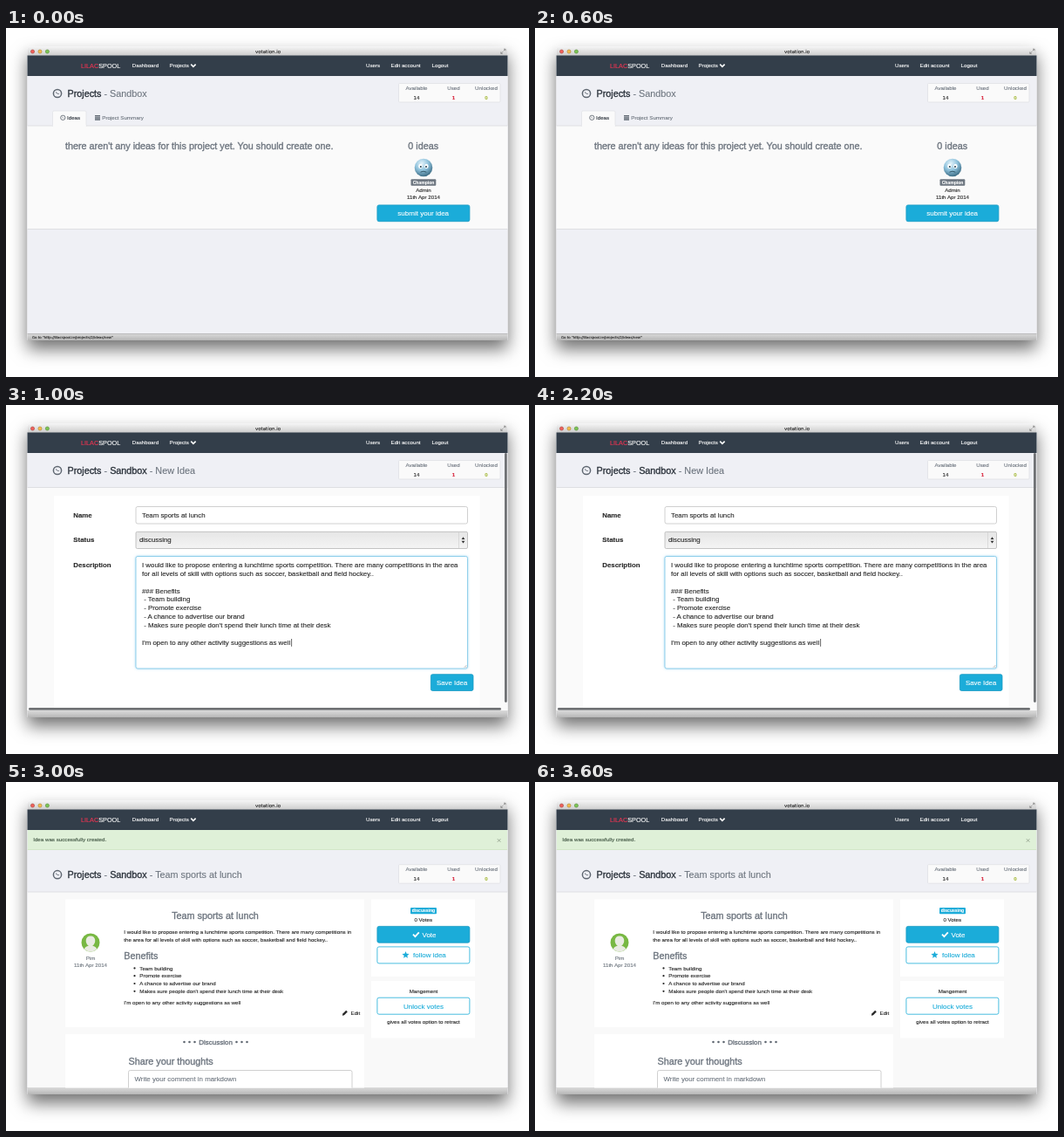
An HTML page for the animation above (4 s loop, 600 by 400 pixels).

```html
<!DOCTYPE html>
<html lang="en">
<head>
<meta charset="utf-8">
<title>Ideas</title>
<style>
  html, body { margin: 0; width: 100%; height: 100%; overflow: hidden; background: #fff; }
  svg { display: block; width: 600px; height: 400px; font-family: "Liberation Sans", Arial, sans-serif; }
  text { white-space: pre; color: #262626; stroke-width: .12px; }
  text, tspan { fill: currentColor; stroke: currentColor; }
  .xs { font-size: 6.2px; }
  .sm { font-size: 7.87px; }
  .btn { font-size: 8px; }
  .lg { font-size: 10.8px; }
  .tag { font-size: 5.05px; font-weight: bold; color: #fff; text-anchor: middle; }
  .ui { font-family: "DejaVu Sans", Verdana, sans-serif; }
  .mid { text-anchor: middle; }
  .med { stroke-width: .35px; }
  .bold { font-weight: bold; }
  .gray { color: #6d757f; }
  .dark { color: #2d343d; }
  .white { color: #fff; }
  .cyan { color: #1bacd9; }
  .red { color: #d8243c; }
  .lime { color: #a5b93a; }
  .pink { color: #ee3552; }
  .moss { color: #3f5441; }
  .card { fill: #fff; }
  .line { fill: none; stroke: #d9dade; stroke-width: .8; }
  .field { fill: #fff; stroke: #c4c4c4; stroke-width: .8; }
  .solid { fill: #1bacd9; stroke: #189ac3; stroke-width: .8; }
  .hollow { fill: #fff; stroke: #1bacd9; stroke-width: .8; }
  .badge { fill: #1bacd9; }
  .icon { fill: none; stroke: #5f6771; }

  .scene { animation: 4s step-end infinite; }
  #empty { animation-name: first; }
  #form { animation-name: second; }
  #result { animation-name: third; }
  @keyframes first { 0% { visibility: visible } 25%, 100% { visibility: hidden } }
  @keyframes second { 0% { visibility: hidden } 25% { visibility: visible } 75%, 100% { visibility: hidden } }
  @keyframes third { 0% { visibility: hidden } 75%, 100% { visibility: visible } }
</style>
</head>
<body>
<svg viewBox="0 0 600 400">
  <defs>
    <linearGradient id="chrome" x2="0" y2="1">
      <stop stop-color="#f4f4f4"/><stop offset="1" stop-color="#cbcbcb"/>
    </linearGradient>
    <linearGradient id="status" x2="0" y2="1">
      <stop stop-color="#dadada"/><stop offset="1" stop-color="#b6b6b6"/>
    </linearGradient>
    <linearGradient id="select" x2="0" y2="1">
      <stop stop-color="#e6e6e6"/><stop offset="1" stop-color="#f4f4f4"/>
    </linearGradient>
    <radialGradient id="ball" cx=".4" cy=".28" r=".75">
      <stop stop-color="#e4f4fb"/><stop offset=".5" stop-color="#8fc2dc"/><stop offset="1" stop-color="#37677f"/>
    </radialGradient>
    <filter id="shadow" x="-10%" y="-12%" width="120%" height="130%">
      <feDropShadow dx="0" dy="10" stdDeviation="9.5" flood-color="#000" flood-opacity=".56"/>
    </filter>
    <filter id="glow" x="-5%" y="-8%" width="110%" height="116%">
      <feDropShadow dx="0" dy="0" stdDeviation="1.4" flood-color="#66bfe9" flood-opacity=".6"/>
    </filter>
    <clipPath id="page"><rect x="24.5" y="55" width="551" height="295.5"/></clipPath>
    <g id="clock" class="icon">
      <circle r="4.6" stroke-width="1.5"/>
      <path d="M-2 -1.5 L.3 .4 H1.8" stroke-width="1"/>
    </g>
    <g id="stats">
      <rect x="450.5" y="63.5" width="116.5" height="21.5" rx="1" fill="#fafafa" stroke="#e0e1e5" stroke-width=".8"/>
      <g class="xs mid">
        <text x="471" y="71.2" class="gray">Available</text>
        <text x="513.5" y="71.2" class="gray">Used</text>
        <text x="551" y="71.2" class="gray">Unlocked</text>
        <text x="471" y="81.8">14</text>
        <text x="513.5" y="81.8" class="bold red">1</text>
        <text x="551" y="81.8" class="bold lime">0</text>
      </g>
    </g>
  </defs>

  <!-- window -->
  <path d="M24.5 358V25q0-3.5 3.5-3.5H572q3.5 0 3.5 3.5V358Z" fill="#eff0f5" filter="url(#shadow)"/>
  <path d="M24.5 32V25q0-3.5 3.5-3.5H572q3.5 0 3.5 3.5V32Z" fill="url(#chrome)"/>
  <g stroke-width=".6">
    <circle cx="30.5" cy="27" r="2.1" fill="#f0605a" stroke="#a5443f"/>
    <circle cx="39" cy="27" r="2.1" fill="#f6bd4c" stroke="#a98035"/>
    <circle cx="47.4" cy="27" r="2.1" fill="#7cc653" stroke="#54883a"/>
  </g>
  <text x="300.5" y="29.3" class="ui mid" font-size="5.45">votation.io</text>
  <path d="M570.8 26.3L572.8 24.3M571 24.2H573V26.2M570 27.2L568 29.2M567.8 27.3V29.4H569.8" fill="none" stroke="#777" stroke-width=".7"/>

  <rect x="24.5" y="31.5" width="551" height="23.5" fill="#333e4a"/>
  <text x="86" y="45.7" font-size="7.27" class="white"><tspan class="pink">LILAC</tspan>SPOOL</text>
  <g class="xs">
    <text x="144.8" y="45.2" class="white">Dashboard</text>
    <text x="187.5" y="45.2" class="white">Projects</text>
    <text x="413" y="45.2" class="white">Users</text>
    <text x="441.5" y="45.2" class="white">Edit account</text>
    <text x="488.5" y="45.2" class="white">Logout</text>
  </g>
  <path d="M212.2 41.6L214.9 44.3L217.6 41.6" fill="none" stroke="#fff" stroke-width="1.6"/>

  <rect x="24.5" y="350.5" width="551" height="7.5" fill="url(#status)"/>
  <path d="M24.5 350.6H575.5" stroke="#a6a6a6" stroke-width=".7"/>

  <!-- empty project -->
  <g id="empty" class="scene">
    <use href="#clock" x="59" y="75"/>
    <text x="70.5" y="79.2" class="lg gray"><tspan class="dark med">Projects</tspan> - Sandbox</text>
    <use href="#stats"/>
    <rect x="24.5" y="112" width="551" height="118.5" fill="#fafafa"/>
    <path d="M24.5 112H575.5M24.5 230.5H575.5" class="line"/>
    <path d="M53.5 113V96.5q0-1.5 1.5-1.5H90.5q1.5 0 1.5 1.5V113" fill="#fafafa" stroke="#e0e1e5" stroke-width=".7"/>
    <rect x="53.9" y="111" width="37.7" height="3" fill="#fafafa"/>
    <use href="#clock" transform="translate(65.3 102.8) scale(.58)"/>
    <text x="70" y="105.1" class="xs dark">Ideas</text>
    <path d="M102 100.7H108M102 102.9H108M102 105.1H108" class="icon" stroke-width="1.5"/>
    <text x="110.3" y="105.1" class="xs gray">Project Summary</text>
    <text x="68" y="139.2" class="lg gray med">there aren't any ideas for this project yet. You should create one.</text>
    <text x="478.7" y="139.2" class="lg gray med mid">0 ideas</text>
    <circle cx="479" cy="160" r="10.3" fill="url(#ball)"/>
    <g fill="#fff">
      <ellipse cx="475.4" cy="158.4" rx="2.2" ry="2.6"/><ellipse cx="482.4" cy="158.4" rx="2.2" ry="2.6"/>
    </g>
    <g fill="#23414f">
      <circle cx="475.8" cy="159" r="1"/><circle cx="482" cy="159" r="1"/>
    </g>
    <path d="M475.5 165.2q3.4-2 6.8 0" fill="none" stroke="#294b5b" stroke-width=".9"/>
    <rect x="464.5" y="173.2" width="28.8" height="7.6" rx="1" fill="#6d7680"/>
    <text x="479" y="178.9" class="tag">Champion</text>
    <text x="479" y="187.5" class="xs mid">Admin</text>
    <text x="479" y="196.2" class="xs mid">11th Apr 2014</text>
    <rect x="425.9" y="202.9" width="106" height="18.8" rx="2" class="solid"/>
    <text x="478.7" y="215" class="btn white mid">submit your idea</text>
    <text x="30" y="356" class="ui" font-size="3.95">Go to "http://lilacspool.ie/projects/2/ideas/new"</text>
  </g>

  <!-- new idea form -->
  <g id="form" class="scene">
    <use href="#clock" x="59" y="75"/>
    <text x="70.5" y="79.2" class="lg gray"><tspan class="dark med">Projects</tspan> - <tspan class="dark med">Sandbox</tspan> - New Idea</text>
    <use href="#stats"/>
    <rect x="24.5" y="94.5" width="551" height="256" fill="#fafafa"/>
    <path d="M24.5 94.5H575.5" class="line"/>
    <rect x="55" y="104" width="488.5" height="246" class="card"/>
    <g class="sm bold">
      <text x="77.3" y="128.5">Name</text>
      <text x="77.3" y="157">Status</text>
      <text x="77.3" y="185.5">Description</text>
    </g>
    <rect x="149" y="116.5" width="380.5" height="19.5" rx="2" class="field"/>
    <text x="156" y="129.2" class="sm">Team sports at lunch</text>
    <rect x="149" y="145.3" width="380.5" height="19.2" rx="1.5" fill="url(#select)" stroke="#b5b5b5" stroke-width=".8"/>
    <path d="M519.5 145.6V164.2" stroke="#ccc" stroke-width=".6"/>
    <path d="M522.6 153.9L524.5 151.2L526.4 153.9ZM522.6 155.7L524.5 158.4L526.4 155.7Z" fill="#333"/>
    <text x="153" y="157.2" class="sm">discussing</text>
    <rect x="149" y="173.5" width="380.5" height="128.5" rx="2" fill="#fff" stroke="#7cc6e8" stroke-width=".8" filter="url(#glow)"/>
    <path d="M525.5 301L528.5 298M527.3 301L528.5 299.800" stroke="#999" stroke-width=".6"/>
    <g class="sm">
      <text x="156" y="185.7">I would like to propose entering a lunchtime sports competition. There are many competitions in the area</text>
      <text x="156" y="195.6">for all levels of skill with options such as soccer, basketball and field hockey..</text>
      <text x="156" y="215.5">### Benefits</text>
      <text x="156" y="225.4"> - Team building</text>
      <text x="156" y="235.4"> - Promote exercise</text>
      <text x="156" y="245.3"> - A chance to advertise our brand</text>
      <text x="156" y="255.3"> - Makes sure people don't spend their lunch time at their desk</text>
      <text x="156" y="275">I'm open to any other activity suggestions as well</text>
    </g>
    <path d="M327.6 268V276.8" stroke="#222" stroke-width=".7"/>
    <rect x="487.4" y="308.7" width="48.6" height="18.8" rx="2" class="solid"/>
    <text x="511.6" y="320.8" class="sm white mid">Save Idea</text>
    <rect x="572" y="55" width="2.8" height="286" rx="1.4" fill="#6f7174"/>
    <rect x="26" y="347" width="542" height="2.8" rx="1.4" fill="#6f7174"/>
  </g>

  <!-- created idea -->
  <g id="result" class="scene" clip-path="url(#page)">
    <rect x="24.5" y="55" width="551" height="22.5" fill="#dff0d8"/>
    <path d="M24.5 77.5H575.5" stroke="#cfe5c0" stroke-width=".8"/>
    <text x="31.2" y="68.3" class="xs moss">Idea was successfully created.</text>
    <path d="M563.8 65.2L567.4 68.8M567.4 65.2L563.8 68.8" stroke="#9bab96" stroke-width="1"/>
    <g transform="translate(0 31.2)">
      <use href="#clock" x="59" y="75"/>
      <text x="70.5" y="79.2" class="lg gray"><tspan class="dark med">Projects</tspan> - <tspan class="dark med">Sandbox</tspan> - Team sports at lunch</text>
      <use href="#stats"/>
    </g>
    <rect x="24.5" y="126" width="551" height="225" fill="#f9f9f9"/>
    <path d="M24.5 126H575.5" class="line"/>
    <g class="card">
      <rect x="68" y="134.5" width="343" height="146.5"/>
      <rect x="68" y="289" width="343" height="62"/>
      <rect x="419" y="134.5" width="119" height="88.5"/>
      <rect x="419" y="228" width="119" height="65.5"/>
    </g>

    <text x="240" y="157.3" class="lg gray med mid">Team sports at lunch</text>
    <circle cx="97" cy="184" r="10.5" fill="#78b843"/>
    <path d="M89.8 191.6q1.2-3.4 5-3.8c-4.6-2.8-4.2-11.3 2.2-11.3s6.8 8.5 2.2 11.3q3.8 .4 5 3.8a10.5 10.5 0 0 1-14.4 0Z" fill="#e9ebe2"/>
    <text x="97" y="203.7" class="xs gray mid">Pim</text>
    <text x="97" y="212.3" class="xs gray mid">11th Apr 2014</text>
    <g class="xs">
      <text x="135.3" y="174.3">I would like to propose entering a lunchtime sports competition. There are many competitions in</text>
      <text x="135.3" y="183.2">the area for all levels of skill with options such as soccer, basketball and field hockey..</text>
      <text x="153.3" y="215.5">Team building</text>
      <text x="153.3" y="224.3">Promote exercise</text>
      <text x="153.3" y="233.1">A chance to advertise our brand</text>
      <text x="153.3" y="241.9">Makes sure people don't spend their lunch time at their desk</text>
      <text x="135.3" y="254.5">I'm open to any other activity suggestions as well</text>
      <text x="395.5" y="267.2">Edit</text>
    </g>
    <text x="135.3" y="203" class="lg gray med">Benefits</text>
    <path d="M147.5 213.4h0M147.5 222.2h0M147.5 231h0M147.5 239.8h0" stroke="#262626" stroke-width="2.2" stroke-linecap="round"/>
    <path d="M385.8 267.8l.6-2.2 3.8-3.8 1.6 1.6-3.8 3.8Z" fill="#262626"/>

    <path d="M204.5 298h0M210.5 298h0M216.5 298h0M264.5 298h0M270.5 298h0M276.5 298h0" class="icon" stroke-width="2.6" stroke-linecap="round"/>
    <text x="240.5" y="300.7" class="btn gray med mid">Discussion</text>
    <text x="140.5" y="324.2" class="lg gray med">Share your thoughts</text>
    <rect x="140.5" y="330.5" width="256.5" height="40" rx="2" class="field"/>
    <text x="147.5" y="343" class="sm gray">Write your comment in markdown</text>

    <rect x="464" y="144" width="30" height="7.3" rx="1" class="badge"/>
    <text x="479" y="149.3" class="tag">discussing</text>
    <text x="478.7" y="160.1" class="xs mid">0 Votes</text>
    <rect x="425.9" y="165.4" width="106" height="18.8" rx="2" class="solid"/>
    <path d="M467 174.7L469.4 177.1L473.8 172.3" fill="none" stroke="#fff" stroke-width="1.8"/>
    <text x="477.5" y="177.6" class="btn white">Vote</text>
    <rect x="425.9" y="188.9" width="106" height="19" rx="2" class="hollow"/>
    <path d="M458.5 194l1.1 2.8 3 .2-2.300 1.900.7 2.900-2.500-1.600-2.500 1.600.7-2.900-2.300-1.900 3-.2Z" class="badge"/>
    <text x="467" y="201.2" class="btn cyan">follow idea</text>
    <text x="479" y="242" class="xs mid">Mangement</text>
    <rect x="425.9" y="247.2" width="106" height="19" rx="2" class="hollow"/>
    <text x="479" y="259.5" class="btn cyan mid">Unlock votes</text>
    <text x="479" y="277.2" class="xs mid">gives all votes option to retract</text>
  </g>
</svg>
</body>
</html>
```
